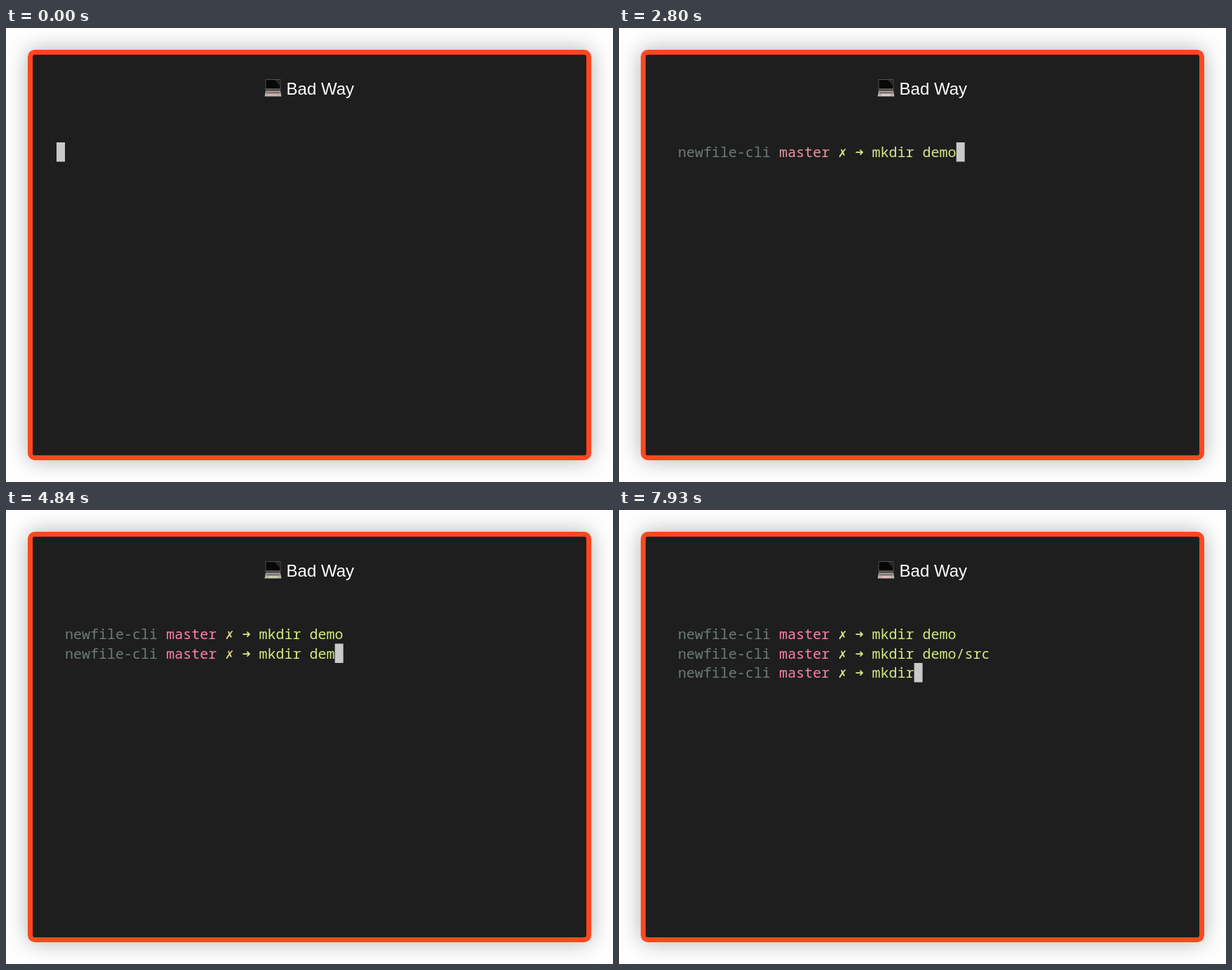
An HTML page that plays this animation: 865 by 647 pixels, repeating every 8000 ms.

```html
<!DOCTYPE html>
<html lang="en">
<head>
<meta charset="utf-8">
<title>Terminal</title>
<style>
  html, body { margin: 0; height: 100%; overflow: hidden; background: #fefefe; }
  #window {
    position: absolute; left: 31px; top: 31px; width: 803px; height: 585px;
    box-sizing: border-box; border: 7px solid #ff4820; border-radius: 10px;
    background: #1e1e1e; box-shadow: 0 0 30px rgba(0, 0, 0, .3);
  }
  svg { position: absolute; left: 0; top: 0; }
  .title { font: 24px "Liberation Sans", Arial, sans-serif; fill: #fff; }
  .line { font: 20px "Noto Sans Mono", monospace; }
  .sign { font: 20px "DejaVu Sans Mono", monospace; }
  .dir { fill: #6c7b79; }
  .branch { fill: var(--branch); }
  .cross { fill: var(--cross); }
  .accent { fill: var(--accent); }
</style>
</head>
<body>
<div id="window"></div>
<svg id="stage" width="865" height="647" viewBox="0 0 865 647">
  <g id="laptop">
    <rect x="369.5" y="73" width="22" height="17" rx="1" fill="#55504f"/>
    <rect x="370.5" y="74" width="20" height="12" fill="#080808"/>
    <path d="M383 74h7.5v9z" fill="#272727"/>
    <path d="M370 90h21l1.5 7.5h-24z" fill="#b9b5b2"/>
    <path d="M371 91h19l.6 2.5h-20.2z" fill="#777372"/>
    <path d="M375 94h11l1 3h-13z" style="fill:var(--pad)"/>
  </g>
  <text class="title" x="399.6" y="95">Bad Way</text>
  <g id="lines"></g>
  <rect id="cursor" width="12" height="27.5" fill="#c9c9c9"/>
</svg>
<script>
const LOOP = 8000, LEFT = 72, TOP = 163, CELL = 12.02, ROW = 27.5, PROMPT_CELLS = 24;

// Each line: when the cursor arrives, when the prompt shows, when each key is struck.
const lines = [
  { start: 0, prompt: 30, text: "mkdir demo",
    keys: [1510, 1550, 1640, 1730, 1820, 2050, 2610, 2670, 2740, 2800] },
  { start: 3170, prompt: 3310, text: "mkdir demo/src",
    keys: [3910, 3950, 4050, 4150, 4250, 4480, 4680, 4760, 4840, 4900, 5300, 5430, 5600, 5830] },
  { start: 6820, prompt: 6960, text: "mkdir",
    keys: [7570, 7660, 7750, 7840, 7930] }
];

// The colours step as the session goes on.
const themes = [
  { from: 0, branch: "#eda0b0", cross: "#dcbd82", accent: "#dcbd82", pad: "#e5a9ae" },
  { from: 1640, branch: "#ea959e", cross: "#d6e984", accent: "#d6e984", pad: "#ddcfbd" },
  { from: 3310, branch: "#ff80a8", cross: "#dfc787", accent: "#d3eb7e", pad: "#bfd08c" },
  { from: 4680, branch: "#ff80a8", cross: "#dcd582", accent: "#d3eb7e", pad: "#cfcda5" },
  { from: 5300, branch: "#ff80a8", cross: "#d3eb7e", accent: "#d3eb7e", pad: "#dfbfb2" }
];

const stage = document.getElementById("stage");
const group = document.getElementById("lines");
const cursor = document.getElementById("cursor");
const column = n => LEFT + n * CELL;

function addText(parent, className, cell, row, text) {
  const node = document.createElementNS(stage.namespaceURI, "text");
  node.setAttribute("class", className);
  node.setAttribute("x", column(cell));
  node.setAttribute("y", TOP + row * ROW + 21);
  node.textContent = text;
  parent.append(node);
  return node;
}

lines.forEach((line, row) => {
  line.node = document.createElementNS(stage.namespaceURI, "g");
  group.append(line.node);
  addText(line.node, "line dir", 1, row, "newfile-cli");
  addText(line.node, "line branch", 13, row, "master");
  addText(line.node, "sign cross", 20, row, "✗");
  addText(line.node, "sign accent", 22, row, "➜");
  line.typed = addText(line.node, "line accent", PROMPT_CELLS, row, "");
});

function draw(t) {
  lines.forEach((line, row) => {
    const prompted = t >= line.prompt;
    const count = line.keys.filter(k => t >= k).length;
    line.node.style.display = prompted ? "" : "none";
    line.typed.textContent = line.text.slice(0, count);
    if (t >= line.start) {
      cursor.setAttribute("x", column(prompted ? PROMPT_CELLS + count : 0));
      cursor.setAttribute("y", TOP + row * ROW);
    }
  });
  const theme = themes.filter(c => t >= c.from).pop();
  for (const name of ["branch", "cross", "accent", "pad"])
    stage.style.setProperty("--" + name, theme[name]);
}

function frame() {
  draw(performance.now() % LOOP);
  requestAnimationFrame(frame);
}
frame();
</script>
</body>
</html>
```
